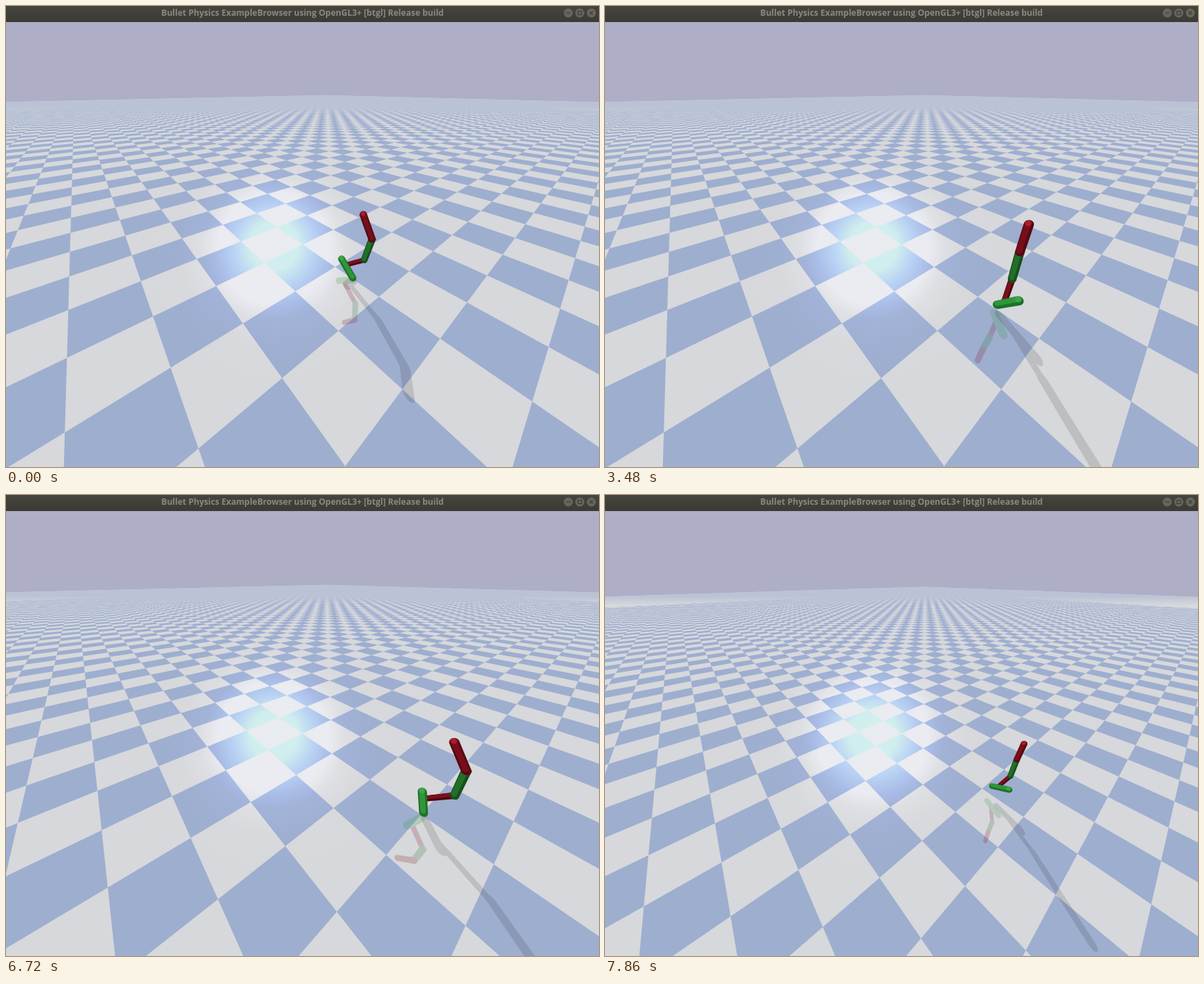
Animation of 849 by 660 pixels, one loop 8000 ms. Source, as an HTML page with a canvas:

```html
<!DOCTYPE html>
<html lang="en">
<head>
<meta charset="utf-8">
<title>Hopper simulation</title>
<style>
html, body { margin: 0; width: 100%; height: 100%; overflow: hidden; background: #aeaec7; }
canvas, svg { position: absolute; left: 0; top: 0; display: block; }
text { font: bold 12.06px "Open Sans", "Noto Sans", sans-serif; fill: #8b8880; text-anchor: middle; }
</style>
</head>
<body>
<canvas id="stage" width="849" height="660"></canvas>
<svg width="849" height="23">
  <defs>
    <linearGradient id="bar" x2="0" y2="1">
      <stop offset="0" stop-color="#45443d"/><stop offset="1" stop-color="#3b3a35"/>
    </linearGradient>
  </defs>
  <rect width="849" height="23" fill="url(#bar)"/>
  <text x="424.5" y="14">Bullet Physics ExampleBrowser using OpenGL3+ [btgl] Release build</text>
  <g fill="#67655d">
    <circle cx="805" cy="10" r="6.5"/><circle cx="821.5" cy="10" r="6.5"/><circle cx="838" cy="10" r="6.5"/>
  </g>
  <path d="M802 10h6M819 7.5h5v5h-5zM835.7 7.7l4.6 4.6m0-4.6l-4.6 4.6" fill="none" stroke="#3a3934" stroke-width="1.1"/>
</svg>
<script>
const WIDTH = 849, HEIGHT = 660, LOOP = 8000;
const CENTER_X = 424.5, CENTER_Y = 341.5, FOCAL = 318.5;
const YAW = 50 * Math.PI / 180, PITCH = 35 * Math.PI / 180;
const [cosYaw, sinYaw, cosPitch, sinPitch] = [Math.cos(YAW), Math.sin(YAW), Math.cos(PITCH), Math.sin(PITCH)];
const LIGHT = [-0.707, 0.424, 0.566];

function newLayer() {
  const canvas = document.createElement('canvas');
  canvas.width = WIDTH;
  canvas.height = HEIGHT;
  return canvas.getContext('2d');
}
const ctx = stage.getContext('2d');
const floorCtx = newLayer();
const mirrorCtx = newLayer();

// time, camera distance, ankle x, ankle z, then foot pitch and shin, thigh, torso lean
const POSES = [
  [0,    5,   1.23, 0.195, -0.695, 0.81,  0.135, -0.607],
  [1280, 5,   1.65, 0.355, -0.99,  0.70, -0.289, -0.24],
  [2360, 5,   2.00, 0.35,  -0.2,   0.40, -0.20,  -0.12],
  [3480, 5,   2.41, 0.20,   0.903, -0.03, -0.07, -0.04],
  [4740, 5,   2.61, 0.055,  0.04,  0.08,  0.084,  0.08],
  [6440, 5,   2.83, 0.295, -1.16,  0.755, 0.022, -0.839],
  [7000, 6,   3.02, 0.35,  -1.28,  0.664, -0.138, -0.54],
  [7860, 7.2, 3.31, 0.32,   0.5,   0.33,  0,      0.04],
];

// The picture advances in held steps of 140 ms, restarting at these times.
const STEP_STARTS = [0, 20, 2360, 5740, 6860, 7860];

function heldTime(t) {
  const start = STEP_STARTS.filter(s => s <= t).pop();
  return start + Math.floor((t - start) / 140) * 140;
}

function poseAt(t) {
  const next = POSES.findIndex(pose => pose[0] > t);
  if (next < 0) return POSES.at(-1);
  const from = POSES[next - 1], to = POSES[next];
  const k = (t - from[0]) / (to[0] - from[0]);
  return from.map((v, i) => v + (to[i] - v) * k);
}

function project([x, y, z], distance) {
  const right = x * cosYaw + y * sinYaw;
  const ahead = y * cosYaw - x * sinYaw;
  const depth = distance + ahead * cosPitch - z * sinPitch;
  const scale = FOCAL / depth;
  return [CENTER_X + right * scale, CENTER_Y - (ahead * sinPitch + z * cosPitch) * scale, depth];
}

function addPolygon(path, points) {
  points.forEach(([x, y], i) => i ? path.lineTo(x, y) : path.moveTo(x, y));
  path.closePath();
}

// Gradient centred on the specular glare, spreading towards the viewer.
function glare(stops) {
  const gradient = floorCtx.createRadialGradient(385, 340, 0, 381, 356, 172);
  stops.forEach(([at, color]) => gradient.addColorStop(at, color));
  return gradient;
}
const WHITE_TILE = glare([[0, '#e8ebef'], [0.46, '#ebecf1'], [0.6, '#dddfe3'], [0.78, '#d8d9dd'], [1, '#d6d8db']]);
const BLUE_TILE = glare([[0, '#d3f0ee'], [0.2, '#d0eeee'], [0.34, '#b9d2f4'], [0.48, '#a9bce6'],
  [0.58, '#a2b3d8'], [0.78, '#9fafd1'], [1, '#9eaecf']]);
const HAZE = floorCtx.createLinearGradient(0, 145, 0, 158);
HAZE.addColorStop(0, 'rgba(186,195,213,1)');
HAZE.addColorStop(1, 'rgba(186,195,213,0)');

let floorDistance;
function drawFloor(distance) {
  if (distance === floorDistance) return;
  floorDistance = distance;
  const c = floorCtx;
  c.fillStyle = '#aeaec7';
  c.fillRect(0, 0, WIDTH, HEIGHT);

  const plane = new Path2D();
  const farEdge = [[-100, -30, 0], [-100, 100, 0], [20, 100, 0]].map(p => project(p, distance));
  addPolygon(plane, [...farEdge, [1100, HEIGHT], [-200, HEIGHT]]);
  c.fillStyle = WHITE_TILE;
  c.fill(plane);

  const tiles = new Path2D();
  for (let x = -60; x < 60; x++) {
    for (let y = -60; y < 60; y++) {
      if ((x + y) % 2 === 0) continue;
      const corners = [[x, y, 0], [x + 1, y, 0], [x + 1, y + 1, 0], [x, y + 1, 0]].map(p => project(p, distance));
      const visible = corners.every(p => p[2] > 0.5) &&
        corners.some(p => p[0] > 0 && p[0] < WIDTH || p[2] < 4) && corners.some(p => p[1] < HEIGHT);
      if (visible) addPolygon(tiles, corners);
    }
  }
  c.fillStyle = BLUE_TILE;
  c.fill(tiles);

  c.save();
  c.clip(plane);
  c.fillStyle = HAZE;
  c.fillRect(0, 0, WIDTH, 180);
  c.restore();
}

const SAMPLES = 200;
const SPHERE = Array.from({ length: SAMPLES }, (_, i) => {
  const z = 1 - (2 * i + 1) / SAMPLES, ring = Math.sqrt(1 - z * z), angle = i * 2.39996;
  return [ring * Math.cos(angle), ring * Math.sin(angle), z];
});

const offset = (p, dir, k) => p.map((v, i) => v + dir[i] * k);

function convexHull(points) {
  points.sort((a, b) => a[0] - b[0] || a[1] - b[1]);
  const half = list => {
    const out = [];
    for (const p of list) {
      while (out.length > 1) {
        const a = out.at(-2), b = out.at(-1);
        if ((b[0] - a[0]) * (p[1] - a[1]) - (b[1] - a[1]) * (p[0] - a[0]) > 0) break;
        out.pop();
      }
      out.push(p);
    }
    return out.slice(0, -1);
  };
  return [...half(points), ...half([...points].reverse())];
}

const upright = p => p;
const mirrored = ([x, y, z]) => [x, y, -z];
const shadowed = ([x, y, z]) => [x + 1.25 * z, y - 0.75 * z, 0];

function addCapsule(path, from, to, radius, place, distance) {
  const surface = [from, to].flatMap(end => SPHERE.map(n => project(place(offset(end, n, radius)), distance)));
  addPolygon(path, convexHull(surface));
}

function fillCapsule(target, color, ...shape) {
  const path = new Path2D();
  addCapsule(path, ...shape);
  target.fillStyle = color;
  target.fill(path);
}

function limbs([, , x, z, footPitch, shin, thigh, torso]) {
  const lean = (p, angle, length) => offset(p, [Math.sin(angle), 0, Math.cos(angle)], length);
  const ankle = [x, 0, z];
  const knee = lean(ankle, shin, 0.5);
  const hip = lean(knee, thigh, 0.45);
  const toeward = [Math.cos(footPitch), 0, Math.sin(footPitch)];
  return [
    { from: ankle, to: knee, radius: 0.043, dark: '#4c0810', lit: '#7d0f1c', cap: '#8a1220' },
    { from: offset(ankle, toeward, -0.13), to: offset(ankle, toeward, 0.27), radius: 0.063,
      dark: '#1f7028', lit: '#2f963a', cap: '#3aa847' },
    { from: knee, to: hip, radius: 0.054, dark: '#184f1e', lit: '#226f2a', cap: '#226f2a' },
    { from: hip, to: lean(hip, torso, 0.4), radius: 0.054, dark: '#560a12', lit: '#780e1a', cap: '#a81e2b' },
  ];
}

function drawLimb({ from, to, radius, dark, lit, cap }, distance) {
  const top = from[2] > to[2] ? from : to;
  const towardsLight = (p, k) => offset(p, LIGHT, radius * k);
  fillCapsule(ctx, dark, from, to, radius, upright, distance);
  fillCapsule(ctx, lit, towardsLight(from, 0.35), towardsLight(to, 0.35), radius * 0.6, upright, distance);
  fillCapsule(ctx, cap, towardsLight(top, 0.3), towardsLight(top, 0.3), radius * 0.65, upright, distance);
}

function drawReflection(body, distance) {
  mirrorCtx.clearRect(0, 0, WIDTH, HEIGHT);
  for (const { from, to, radius, lit } of body) fillCapsule(mirrorCtx, lit, from, to, radius, mirrored, distance);
  ctx.globalAlpha = 0.2;
  ctx.drawImage(mirrorCtx.canvas, 0, 0);
  ctx.globalAlpha = 1;
}

function drawShadow(body, distance) {
  const shadow = new Path2D();
  for (const { from, to, radius } of body) addCapsule(shadow, from, to, radius, shadowed, distance);
  ctx.fillStyle = 'rgba(0,0,0,0.12)';
  ctx.fill(shadow);
}

function draw(t) {
  const pose = poseAt(heldTime(t));
  const distance = pose[1];
  const body = limbs(pose);

  drawFloor(distance);
  ctx.drawImage(floorCtx.canvas, 0, 0);
  drawReflection(body, distance);
  drawShadow(body, distance);
  for (const limb of body) drawLimb(limb, distance);
}

function tick() {
  draw(performance.now() % LOOP);
  requestAnimationFrame(tick);
}
tick();
</script>
</body>
</html>
```
